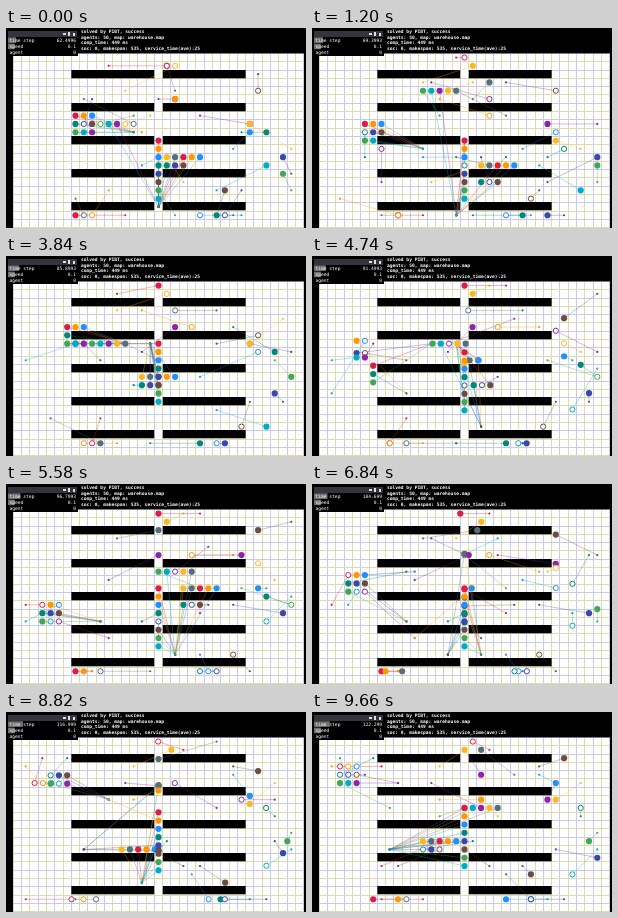
An HTML page with a canvas that plays this animation: 300x200 px, repeating every 9720 ms.

```html
<!DOCTYPE html>
<html lang="en">
<head>
<meta charset="utf-8">
<title>Warehouse agents</title>
<style>
html, body { margin: 0; width: 100%; height: 100%; overflow: hidden; background: #000; }
canvas { display: block; width: 300px; height: 200px; }
</style>
</head>
<body>
<canvas id="stage" width="300" height="200"></canvas>
<script>
const ctx = document.getElementById('stage').getContext('2d');
const LOOP = 9720, STEP = 60, CELL = 8.3, COLS = 35, ROWS = 21;
const LEFT = 7.25, TOP = 25.4, MIDDLE = 17;
const palette = ['#dc1e46', '#ff9800', '#1e90ff', '#00897b', '#3a48ad', '#6d4c41',
  '#43a854', '#00acc1', '#8e24aa', '#ffb81c', '#546e7a'];

// Moments when the crowds gather, and the shared destination at each
const times = [0, 1200, 2580, 3840, 5580, 8040, 9660];
const hubs = [[17, 18], [16, 19], [11, 13], [16, 7], [19, 17], [15, 17], [8, 13]];

const px = c => LEFT + (c + 0.5) * CELL;
const py = r => TOP + (r + 0.5) * CELL;
const clamp = (v, lo, hi) => Math.max(lo, Math.min(hi, v));
const noise = n => { const v = Math.sin(n * 127.1 + 11.7) * 43758.5453; return v - Math.floor(v); };
const isAisle = c => c <= 6 || c === MIDDLE || c >= 28;
const band = r => Math.floor((r + 2) / 4);

// Nearest whole cell that is not inside a shelf
function freeCell(c, r) {
  c = clamp(Math.round(c), 1, COLS - 2);
  r = clamp(Math.round(r), 0, ROWS - 2);
  return [c, r % 4 === 2 && !isAisle(c) ? r + 1 : r];
}

// Along the shelf, through the nearest aisle, along the next shelf
function route([x0, y0], [x1, y1]) {
  const detour = c => Math.abs(x0 - c) + Math.abs(x1 - c);
  let aisle = x1;
  if (band(y0) !== band(y1))
    aisle = [x0, x1, 6, MIDDLE, 28].filter(isAisle).sort((a, b) => detour(a) - detour(b))[0];
  return [[x0, y0], [aisle, y0], [aisle, y1], [x1, y1]];
}

const span = (a, b) => Math.abs(a[0] - b[0]) + Math.abs(a[1] - b[1]);

function along(path, f) {
  let rest = f * path.slice(1).reduce((sum, p, i) => sum + span(path[i], p), 0);
  for (let i = 1; i < path.length; i++) {
    const a = path[i - 1], b = path[i], d = span(a, b);
    if (d && rest <= d) return [a[0] + (b[0] - a[0]) * rest / d, a[1] + (b[1] - a[1]) * rest / d];
    rest -= d;
  }
  return path[path.length - 1];
}

const agents = [];

// place(i, pose) gives a cell; target(pose) the shared goal, if there is one
function crowd(count, ringShare, place, target) {
  for (let i = 0; i < count; i++) {
    const id = agents.length;
    const stops = times.map((_, pose) => freeCell(...place(i, pose, id)));
    const rings = times.map((_, pose) => noise(id * 17 + pose * 5) < ringShare);
    const goals = stops.map(([c, r], pose) => {
      const seed = id * 13 + pose * 71;
      if (target && !rings[pose] && noise(seed) < 0.8) return freeCell(...target(pose));
      return freeCell(c + 14 * (noise(seed + 1) - 0.5), r + 7 * (noise(seed + 2) - 0.5));
    });
    agents.push({
      color: palette[id % palette.length], rings, goals,
      paths: stops.slice(1).map((stop, k) => route(stops[k], stop)),
      swap: 0.35 + 0.3 * noise(id + 500)
    });
  }
}

const block = (anchors, width) => (i, pose) =>
  [anchors[pose][0] + i % width, anchors[pose][1] + Math.floor(i / width)];

const wander = (c, r, w, h) => (i, pose, id) => {
  const drift = k => 0.3 * (noise(id * 31 + pose * 7 + k) - 0.5);
  return [c + w * (noise(id + 40) + drift(1)), r + h * (noise(id * 3 + 90) + drift(2))];
};

const toHub = pose => hubs[pose];
const west = [[7, 7], [5, 8], [4, 3], [6, 5], [3, 11], [4, 5], [2, 3]];
const upperRun = [[10, 8], [12, 4], [9, 5], [9, 7], [17, 7], [18, 4], [17, 8]];
const lowerRun = [[18, 12], [19, 13], [13, 13], [15, 11], [20, 9], [14, 13], [12, 12]];

crowd(9, 0.2, block(west, 3), pose => [west[pose][0] + 7, west[pose][1] + 2]);
crowd(8, 0.05, block(lowerRun, 5), toHub);
crowd(5, 0.1, block(upperRun, 5), toHub);
crowd(8, 0.05, (i, pose) => [MIDDLE, 5 + hubs[pose][1] / 4 + i], toHub);
crowd(5, 0.35, wander(14, 0, 10, 5));
crowd(8, 0.4, wander(27, 1, 6, 14));
crowd(3, 0.6, wander(2, 15, 9, 5));
crowd(4, 0.5, wander(18, 15, 10, 5));

function drawMap() {
  const width = COLS * CELL, height = ROWS * CELL;
  ctx.fillStyle = '#fff';
  ctx.fillRect(LEFT, TOP, width, height);
  for (let c = 0; c <= COLS; c++) {
    ctx.fillStyle = c % 2 ? '#c9c9ee' : '#dedbb0';
    ctx.fillRect(Math.floor(LEFT + c * CELL), TOP, 1, height);
  }
  for (let r = 0; r <= ROWS; r++) {
    ctx.fillStyle = r % 2 ? '#dedbb0' : '#c9c9ee';
    ctx.fillRect(LEFT, Math.floor(TOP + r * CELL), width, 1);
  }
  for (let r = 2; r < ROWS; r += 4) {
    const y = Math.floor(TOP + r * CELL);
    ctx.fillStyle = '#fff';
    ctx.fillRect(148, y, 9, 8);
    ctx.fillStyle = '#000';
    for (const c of [7, 18]) ctx.fillRect(LEFT + c * CELL, y, 10 * CELL, 8.3);
  }
}

function disc(x, y, radius) {
  ctx.beginPath();
  ctx.arc(x, y, radius, 0, 2 * Math.PI);
}

function drawAgents(leg, f) {
  const now = agents.map(a => {
    const pose = leg + (f >= a.swap ? 1 : 0);
    const [c, r] = along(a.paths[leg], f), [gc, gr] = a.goals[pose];
    return { color: a.color, ring: a.rings[pose], x: px(c), y: py(r), gx: px(gc), gy: py(gr) };
  });
  for (const a of now) {
    ctx.strokeStyle = ctx.fillStyle = a.color;
    ctx.globalAlpha = 0.55;
    ctx.lineWidth = 0.6;
    ctx.beginPath();
    ctx.moveTo(a.x, a.y);
    ctx.lineTo(a.gx, a.gy);
    ctx.stroke();
    ctx.globalAlpha = 1;
    disc(a.gx, a.gy, 1.1);
    ctx.fill();
  }
  for (const a of now) {
    disc(a.x, a.y, a.ring ? 2.6 : 3.1);
    ctx.fillStyle = a.ring ? '#fff' : a.color;
    ctx.fill();
    if (!a.ring) continue;
    ctx.strokeStyle = a.color;
    ctx.lineWidth = 1;
    ctx.stroke();
  }
}

function drawPanel(step) {
  ctx.fillStyle = '#000';
  ctx.fillRect(0, 0, 300, TOP);
  ctx.fillRect(1, 2, 71, 26);
  ctx.fillStyle = '#34343f';
  ctx.fillRect(2, 3, 69, 6);
  ctx.fillStyle = '#ddd';
  ctx.fillRect(57, 5, 3, 2);
  ctx.fillRect(62, 4, 2, 4);
  ctx.fillRect(67, 5, 2, 3);

  const rows = [['time step', step.toPrecision(6), step / 535], ['speed', '0.1', 0.1], ['agent', '0', 0]];
  ctx.font = '4.6px "DejaVu Sans Mono", monospace';
  ctx.textBaseline = 'middle';
  rows.forEach(([label, value, level], i) => {
    const y = 9.3 + i * 6.3;
    ctx.fillStyle = '#707070';
    ctx.fillRect(2, y, 69 * level, 5.6);
    ctx.fillStyle = '#fff';
    ctx.textAlign = 'left';
    ctx.fillText(label, 3.5, y + 3);
    ctx.textAlign = 'right';
    ctx.fillText(value, 70, y + 3);
  });

  ctx.textAlign = 'left';
  ctx.font = 'bold 4.6px "DejaVu Sans Mono", monospace';
  ['solved by PIBT, success', 'agents: 50, map: warehouse.map', 'comp_time: 449 ms',
    'soc: 0, makespan: 535, service_time(ave):25'
  ].forEach((line, i) => ctx.fillText(line, 75, 4 + i * 5.6));
}

// The counter advances in tenths with a small rounding drift
const stepAt = t => Math.max(62.4996, Math.round((69.4 + (t - 1200) * 0.006253) * 10) / 10 - 0.0007);

function draw(ms) {
  const t = Math.min(Math.floor(ms / STEP) * STEP, times[times.length - 1]);
  let leg = 0;
  while (leg < times.length - 2 && t >= times[leg + 1]) leg++;
  ctx.fillStyle = '#000';
  ctx.fillRect(0, 0, 300, 200);
  drawMap();
  drawAgents(leg, (t - times[leg]) / (times[leg + 1] - times[leg]));
  drawPanel(stepAt(t));
}

const start = performance.now();
function tick() {
  draw((performance.now() - start) % LOOP);
  requestAnimationFrame(tick);
}
tick();
</script>
</body>
</html>
```
